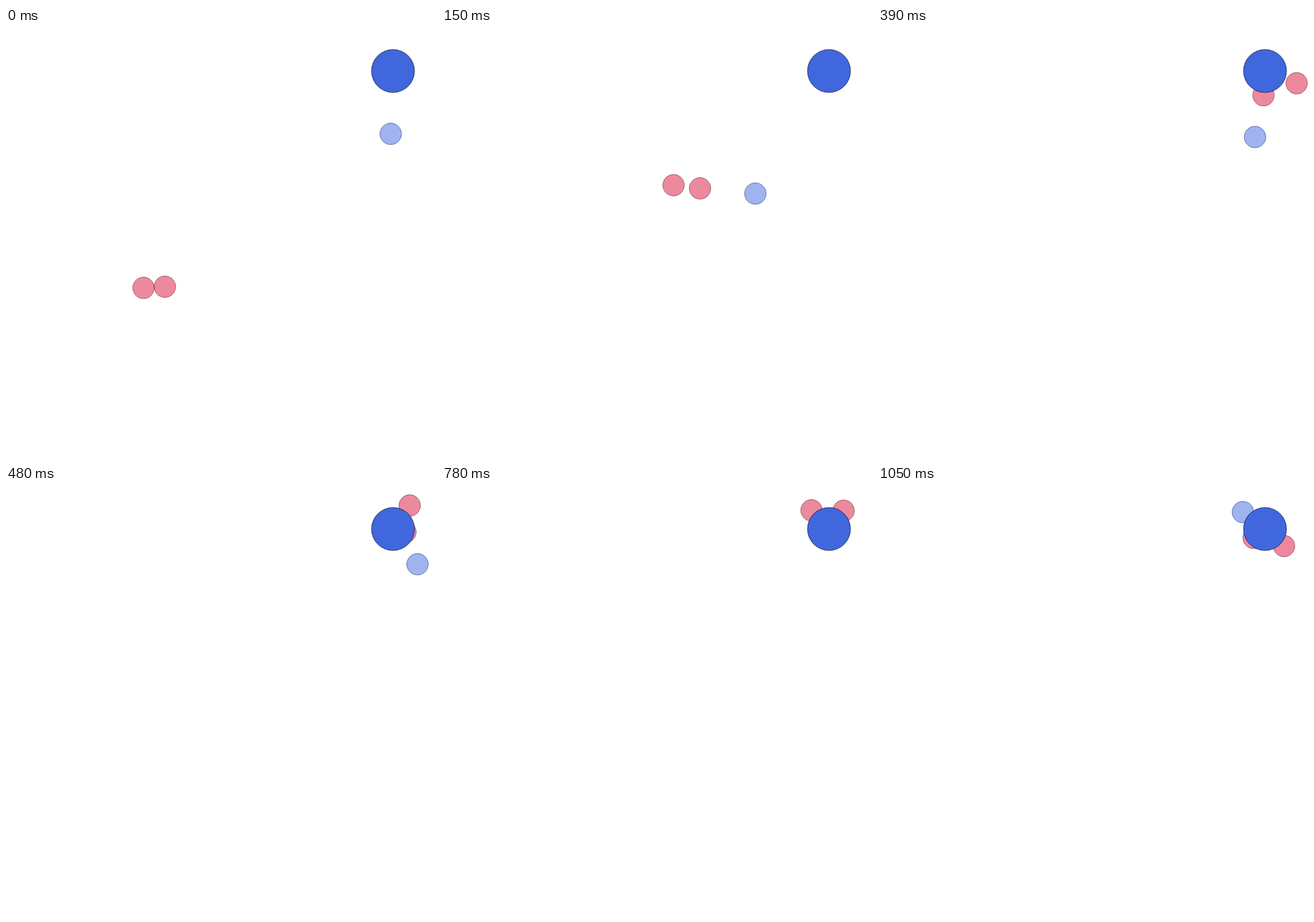
Recreate the animation shown at these times as an HTML page with a canvas. Size 700 by 700 pixels, loop 1080 ms.

```html
<!DOCTYPE html>
<html>
<head>
<meta charset="utf-8">
<title>Orbiting discs</title>
<style>
html, body { margin: 0; width: 100%; height: 100%; overflow: hidden; background: #fff; }
canvas { display: block; }
</style>
</head>
<body>
<canvas id="stage" width="700" height="700"></canvas>
<script>
const ctx = document.getElementById('stage').getContext('2d');
const LOOP = 1080, STEP = 30;
const HUB = { x: 630, y: 70, r: 35 };
const TIMES = [0, 150, 270, 390, 600, 780, 1050];
const PINK = { fill: 'rgba(220,20,60,.5)', line: 'rgba(60,0,12,.5)' };
const BLUE = { fill: 'rgba(65,105,225,.5)', line: 'rgba(0,15,70,.5)' };

// Each disc falls in and circles the hub: key distances and angles
const discs = [
  { ...PINK, dist: [538.2, 314, 132.3, 39.6, 30.1, 38.1, 41.6],
             deg: [139, 143.7, 147.8, 93.6, -81.4, -51.5, 41.8] },
  { ...PINK, dist: [511.1, 283.9, 101.9, 55.2, 51, 41.7, 23.5],
             deg: [136.6, 137.7, 136.6, 21.2, -126, -133.1, -218.1] },
  { ...BLUE, dist: [102.4, 232.8, 177.5, 108.7, 34.3, 14, 45.3],
             deg: [92.1, 121, 137, 98.6, -7.2, -75, -142.6] }
];

const span = i => TIMES[i + 1] - TIMES[i];
const slope = (v, i) => (v[i + 1] - v[i]) / span(i);

// Rate of change at a key, weighted by the neighbouring spans
function rate(v, i) {
  const end = v.length - 1;
  if (i === 0) return (3 * slope(v, 0) - rate(v, 1)) / 2;
  if (i === end) return (3 * slope(v, end - 1) - rate(v, end - 1)) / 2;
  const a = span(i - 1), b = span(i);
  return (b * slope(v, i - 1) + a * slope(v, i)) / (a + b);
}

function smooth(v, t) {
  const i = Math.min(TIMES.findLastIndex(k => k <= t), v.length - 2);
  const u = (t - TIMES[i]) / span(i), w = 1 - u;
  return w * w * (1 + 2 * u) * v[i] + u * u * (3 - 2 * u) * v[i + 1] +
    span(i) * u * w * (w * rate(v, i) - u * rate(v, i + 1));
}

function circle(x, y, r, fill, line) {
  ctx.beginPath();
  ctx.arc(x, y, r, 0, Math.PI * 2);
  ctx.fillStyle = fill;
  ctx.fill();
  ctx.strokeStyle = line;
  ctx.stroke();
}

function draw(t) {
  ctx.fillStyle = '#fff';
  ctx.fillRect(0, 0, 700, 700);
  for (const d of discs) {
    const r = smooth(d.dist, t), a = smooth(d.deg, t) * Math.PI / 180;
    circle(HUB.x + r * Math.cos(a), HUB.y + r * Math.sin(a), HUB.r / 2, d.fill, d.line);
  }
  circle(HUB.x, HUB.y, HUB.r, '#4067dd', 'rgba(0,0,30,.7)');
}

const start = performance.now();
function tick() {
  const t = (performance.now() - start) % LOOP;
  draw(Math.floor(t / STEP) * STEP);
  requestAnimationFrame(tick);
}
tick();
</script>
</body>
</html>
```
